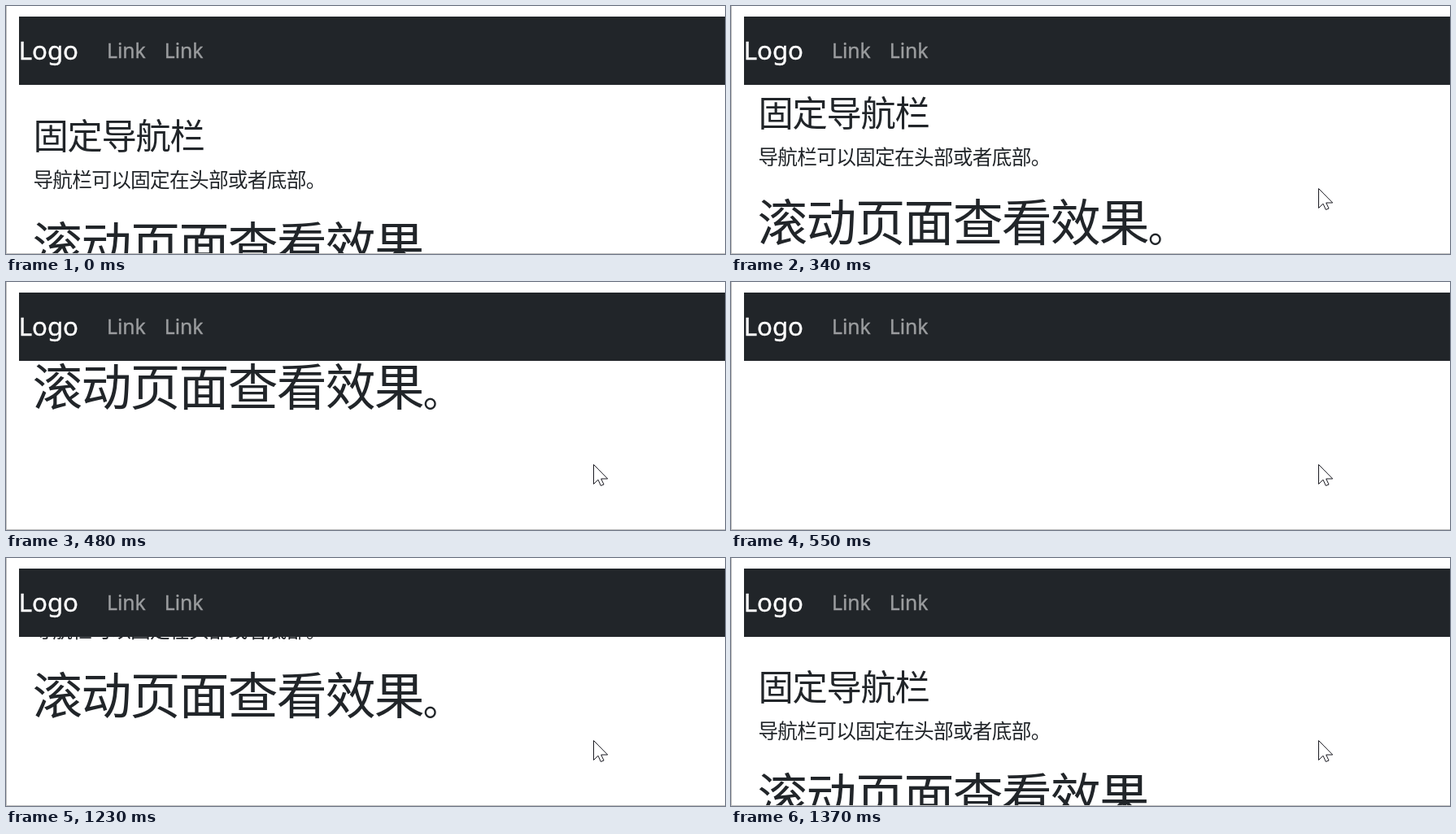
Animation, 884 px wide and 305 px high, one loop 1.44 s. Source, as an HTML page:

```html
<!DOCTYPE html>
<html lang="zh-CN">
<head>
<meta charset="utf-8">
<title>固定导航栏</title>
<style>
  html, body { margin: 0; width: 100%; height: 100%; overflow: hidden; background: #fff; }
  svg { display: block; width: 884px; height: 305px; }
  .page { font-family: "Noto Sans CJK SC", "Noto Sans CJK", sans-serif; fill: #212529; }
  .page text { letter-spacing: -.03em; }
  .nav { font-family: "Noto Sans", sans-serif; font-size: 24.6px; fill: #9b9d9f; stroke: #9b9d9f; stroke-width: .4px; }
  .brand { font-size: 31.2px; fill: #fff; stroke: #fff; }
</style>
</head>
<body>
<svg viewBox="0 0 884 305">
  <clipPath id="view"><rect y="97" width="884" height="208"/></clipPath>
  <g clip-path="url(#view)">
    <g id="content" class="page">
      <text x="33.4" y="175.500" font-size="43.3">固定导航栏</text>
      <text x="33.4" y="223" font-size="24.7">导航栏可以固定在头部或者底部。</text>
      <text x="32.5" y="317" font-size="61.9">滚动页面查看效果<tspan dy="1" font-size="46" font-weight="500">。</tspan></text>
    </g>
  </g>
  <rect x="16" y="13" width="868" height="84" fill="#212529"/>
  <g class="nav">
    <text class="brand" x="15.7" y="66.4">Logo</text>
    <text x="124" y="64">Link</text>
    <text x="194.800" y="64">Link</text>
  </g>
  <path d="M.5 0V305M0 304.5H884" stroke="#c0c0c0"/>
  <path id="cursor" d="M.5.5V24.500L6 19.200L9.300 26.500L13 25L9.700 18H17.700Z" fill="#fff" stroke="#1b1b22"/>
</svg>
<script>
  const LOOP = 1440;
  // Each entry holds from its time until the next one.
  const scrollSteps = [
    [0, 0], [340, 28], [410, 86], [480, 165], [550, 260],
    [1160, 213], [1230, 125], [1300, 47], [1370, 1]
  ];
  const cursorSteps = [[0, null], [70, [735, 242]], [130, [723, 226]], [270, [722, 224]]];

  const content = document.getElementById("content");
  const cursor = document.getElementById("cursor");
  const valueAt = (steps, time) => steps.findLast(([start]) => start <= time)[1];

  function draw(now) {
    const time = now % LOOP;
    const position = valueAt(cursorSteps, time);
    content.setAttribute("transform", `translate(0 ${-valueAt(scrollSteps, time)})`);
    cursor.setAttribute("visibility", position ? "visible" : "hidden");
    if (position) cursor.setAttribute("transform", `translate(${position})`);
  }

  const start = performance.now();
  function tick() {
    draw(performance.now() - start);
    requestAnimationFrame(tick);
  }
  tick();
</script>
</body>
</html>
```
